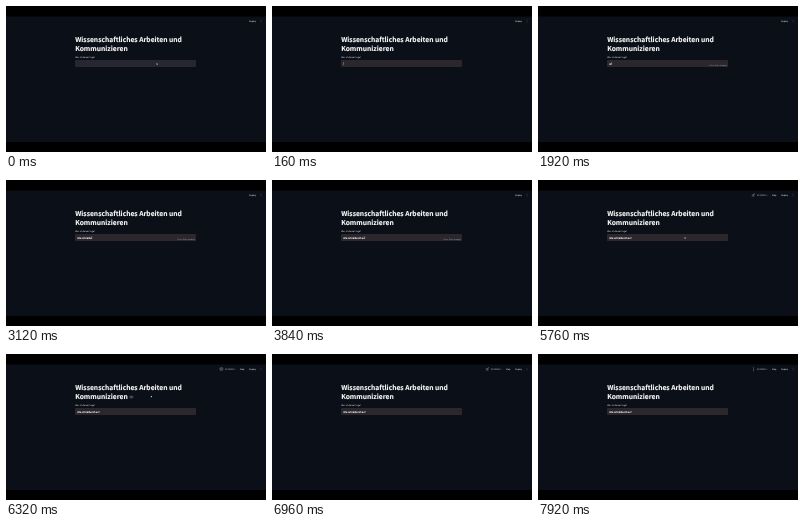
An HTML page that plays this animation: 260 by 146 pixels, repeating every 8000 ms.

```html
<!DOCTYPE html>
<html lang="de">
<head>
<meta charset="utf-8">
<style>
  html, body { margin: 0; width: 100%; height: 100%; overflow: hidden; background: #000; }
  svg { display: block; width: 100%; height: 100%; }
  text { font-family: "Noto Sans CJK JP", "Noto Sans CJK SC", "Noto Sans CJK", "Open Sans", sans-serif; fill: #fafafa; text-rendering: geometricPrecision; }
  .title { font-size: 6.7px; font-weight: 700; stroke: #fafafa; stroke-width: .14; }
  .small { font-size: 2.15px; }
  .input { font-size: 2.45px; stroke: #fafafa; stroke-width: .08; }
  .hint { font-size: 1.9px; fill: #a3a5ab; }
  .line { fill: none; stroke: #c8c9cc; stroke-width: .28; stroke-linecap: round; }
</style>
</head>
<body>
<svg viewBox="0 0 260 146">
  <rect y="10.5" width="260" height="125.5" fill="#0b0f17"/>
  <text class="title" x="69.2" y="36">Wissenschaftliches Arbeiten und</text>
  <text class="title" x="69.2" y="45">Kommunizieren</text>
  <path id="anchor" class="line" d="M125.1 42.2h-.6a.8.8 0 0 0 0 1.6h.6M125.7 42.2h.6a.8.8 0 0 1 0 1.6h-.6M124.7 43h1.4"/>
  <text class="small" x="69.2" y="51.8">Was ist deine Frage?</text>

  <rect id="box" x="69" y="54" width="121" height="7" rx=".8"/>
  <text id="typed" class="input" x="71.2" y="58.5"></text>
  <rect id="caret" y="56.2" width=".3" height="2.8" fill="#fafafa"/>
  <text id="hint" class="hint" x="189" y="60.2" text-anchor="end">Press Enter to apply</text>

  <g id="running">
    <path id="runner" class="line"/>
    <text class="small" x="219" y="15.9" fill-opacity=".75">RUNNING...</text>
    <text class="small" x="233.8" y="15.9">Stop</text>
  </g>
  <text class="small" x="243" y="15.9">Deploy</text>
  <path d="M255 14v.1M255 15v.1M255 16v.1" class="line" stroke-opacity=".6"/>
  <path id="cursor" d="M-.4-.8V.7L0 .3.4 1 .7.8.4.1H.9Z" fill="#fff"/>
</svg>
<script>
const LOOP = 8000;
const SENTENCE = "Wie schreibe ich es?";

// Each entry: start time, value
const typing = [[0, 0], [1920, 1], [2080, 3], [2400, 6], [2560, 8], [2880, 9], [2960, 11],
  [3120, 13], [3360, 14], [3440, 15], [3600, 16], [3760, 17], [3840, 19], [4800, 20]];
const pointer = [[0, [151, 58]], [160, null], [5680, [147, 58]], [6080, [146, 50]],
  [6160, [145.3, 42.5]], [6480, [172, 60]], [6560, [222, 82]], [6640, [256, 88]], [6720, null]];
const ring = "M213.8 15a1.6 1.6 0 1 0 3.2 0a1.6 1.6 0 1 0-3.2 0M214.5 14.2l1.8 1.6M216.3 14.2l-1.8 1.6";
const stride = "M216.3 13.5v.1M215.9 14.2l-.6 1.2 1 .5-.3 1M215.3 15.4l-.5 1-.9.2M214.2 14.8l.7-.7 1 .1.7.8";
const lean = "M216.6 13.4v.1M216 14l-.9 1.6M215.1 15.6l-1.1 1.2M215.1 15.6l1 1.2M214 14.6l2.6.3";
const upright = "M215.5 13.5V17";
const reach = "M215.5 13.5v.1M215.5 14.2v1.5M214 14l1.5.6 1.5-.6M214.4 17l1.1-1.3 1.1 1.3";
const poses = [[5120, ring], [5440, reach], [5520, stride], [5760, lean], [6080, reach],
  [6320, ring], [6640, stride], [6960, lean], [7200, reach], [7440, lean],
  [7520, stride], [7760, ring], [7920, upright]];

const el = id => document.getElementById(id);
const valueAt = (steps, t) => steps.reduce((value, [start, next]) => t >= start ? next : value, null);
const show = (id, visible) => el(id).style.display = visible ? "" : "none";
const started = performance.now();

function draw() {
  const t = (performance.now() - started) % LOOP;
  const focused = t >= 160;
  const submitted = t >= 5120;
  const position = valueAt(pointer, t);

  el("typed").textContent = SENTENCE.slice(0, valueAt(typing, t));
  el("caret").setAttribute("x", 71.4 + el("typed").getComputedTextLength());
  show("caret", focused && t < 4800);
  el("box").setAttribute("fill", focused ? "#2b272d" : "#262730");
  show("hint", t >= 1920 && !submitted);
  show("anchor", t >= 6080 && t < 6480);
  show("running", submitted);
  if (submitted) el("runner").setAttribute("d", valueAt(poses, t));
  show("cursor", position);
  if (position) el("cursor").setAttribute("transform", `translate(${position})`);
  requestAnimationFrame(draw);
}
draw();
</script>
</body>
</html>
```
